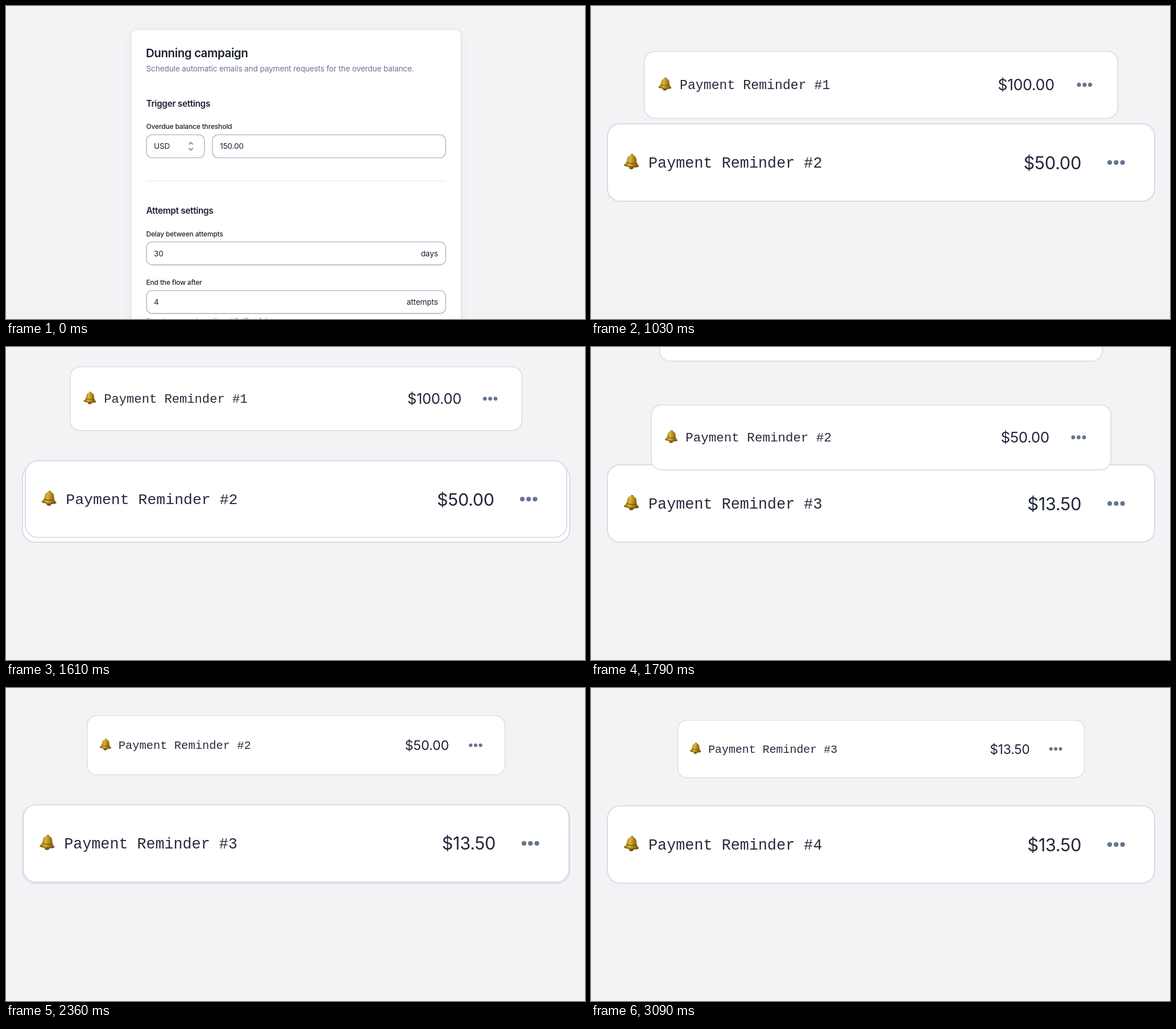
Write an HTML page that moves like this. It is 1018 px wide and 550 px high and loops after 3.36 s.

```html
<!DOCTYPE html>
<html lang="en">
<head>
<meta charset="utf-8">
<title>Dunning campaign</title>
<style>
  html, body { margin: 0; width: 100%; height: 100%; overflow: hidden; background: #f2f3f5; }
  svg { display: block; width: 100vw; height: 100vh; }
  text { font-family: Inter, sans-serif; fill: #1b2130; white-space: pre; }

  .title { font-size: 20.5px; font-weight: 600; letter-spacing: -.021em; }
  .heading { font-size: 15.36px; font-weight: 600; letter-spacing: -.02em; }
  .label { font-size: 11.95px; font-weight: 500; letter-spacing: -.011em; }
  .value { font-size: 13.65px; letter-spacing: -.011em; }
  .muted { fill: #6c7693; }
  .hint { font-size: 11.95px; letter-spacing: -.006em; }
  .end { text-anchor: end; }
  .field { fill: #fff; stroke: #9a9fb6; stroke-width: 1.1; }
  .panel { fill: #fff; stroke: #dcdfe8; filter: drop-shadow(0 3px 6px rgba(25, 33, 61, .08)); }
  .chevron { fill: none; stroke: #6c7693; stroke-width: 1.6; }

  .name { font: 26.8px "IBM Plex Mono", "Liberation Mono", monospace; fill: #252b3b; }
  .price { font-size: 30.7px; letter-spacing: -.009em; text-anchor: end; fill: #20263a; }

  /* Each lift takes about 800 ms of the 3360 ms loop. */
  .card, .form { animation: 3360ms cubic-bezier(.5, 0, 0, 1) infinite; }
  .card { transform: translate(510px, 275px) scale(1); }
  .first { animation-name: first; }
  .second { animation-name: second; }
  .third { animation-name: third; }
  .form { animation-name: cut; animation-timing-function: step-end; }

  @keyframes cut {
    0% { visibility: visible; }
    20.833%, 100% { visibility: hidden; }
  }
  @keyframes first {
    0%, 20.387% { transform: translate(510px, 275px) scale(1); }
    44.196%, 44.435% { transform: translate(510px, 99.3px) scale(.827); }
    68.244%, 100% { transform: translate(510px, -92px) scale(.8); }
  }
  @keyframes second {
    0%, 44.435% { transform: translate(510px, 275px) scale(1); }
    68.244% { transform: translate(510px, 103px) scale(.764); }
    92.054%, 100% { transform: translate(510px, -105px) scale(.74); }
  }
  @keyframes third {
    0%, 68.244% { transform: translate(510px, 275px) scale(1); }
    92.054%, 100% { transform: translate(510px, 107px) scale(.743); }
  }
</style>
</head>
<body>
<svg viewBox="0 0 1018 550">
  <defs>
    <linearGradient id="gold">
      <stop offset="0" stop-color="#8a6512"/>
      <stop offset=".38" stop-color="#dcb638"/>
      <stop offset=".62" stop-color="#ae831b"/>
      <stop offset="1" stop-color="#6b4c0d"/>
    </linearGradient>
    <g id="bell" transform="rotate(4)">
      <ellipse cy="10.4" rx="4.2" ry="3.3" fill="#6b4a0c"/>
      <circle cy="-10.2" r="2.8" fill="#a87d1a"/>
      <path fill="url(#gold)" d="M-13.3 7C-9 4-8.7 0-8.2-4C-7.5-9-4-11 0-11S7.5-9 8.2-4C8.7 0 9 4 13.3 7C13.3 9.5 7 10.6 0 10.6S-13.3 9.5-13.3 7Z"/>
      <path fill="none" stroke="#70500e" stroke-width="1.2" d="M-12.5 7.6Q0 11.5 12.5 7.6M-8.4 2.6Q0 5 8.4 2.6"/>
    </g>
    <g id="base">
      <rect x="-481" y="-68" width="962" height="136" rx="22" fill="#fff" stroke="#dadde6" stroke-width="2"/>
      <use href="#bell" x="-438.5" y="-2"/>
      <g fill="#66748f">
        <circle cx="402" r="4.1"/>
        <circle cx="413.3" r="4.1"/>
        <circle cx="424.6" r="4.1"/>
      </g>
    </g>
  </defs>

  <g class="card">
    <use href="#base"/>
    <text class="name" x="-409" y="9">Payment Reminder #4</text>
    <text class="price" x="352" y="11.5">$13.50</text>
  </g>
  <g class="card third">
    <use href="#base"/>
    <text class="name" x="-409" y="9">Payment Reminder #3</text>
    <text class="price" x="352" y="11.5">$13.50</text>
  </g>
  <g class="card second">
    <use href="#base"/>
    <text class="name" x="-409" y="9">Payment Reminder #2</text>
    <text class="price" x="352" y="11.5">$50.00</text>
  </g>
  <g class="card first">
    <use href="#base"/>
    <text class="name" x="-409" y="9">Payment Reminder #1</text>
    <text class="price" x="352" y="11.5">$100.00</text>
  </g>

  <g class="form">
    <rect width="1018" height="550" fill="#f2f3f5"/>
    <rect class="panel" x="220" y="41.5" width="580" height="600" rx="10"/>
    <text class="title" x="246" y="90">Dunning campaign</text>
    <text class="value muted" x="246.5" y="114.7">Schedule automatic emails and payment requests for the overdue balance.</text>

    <text class="heading" x="246.5" y="177">Trigger settings</text>
    <text class="label" x="246.5" y="216.3">Overdue balance threshold</text>
    <rect class="field" x="247" y="226.3" width="102" height="40.4" rx="10"/>
    <text class="value" x="260" y="251.4">USD</text>
    <path class="chevron" d="M321.4 243.2L325 239.6L328.6 243.2M321.4 249.6L325 253.2L328.6 249.6"/>
    <rect class="field" x="363" y="226.3" width="410" height="40.4" rx="10"/>
    <text class="value" x="376" y="251.4">150.00</text>
    <path stroke="#dfe2ea" d="M247 307.5H773"/>

    <text class="heading" x="246.5" y="365">Attempt settings</text>
    <text class="label" x="246.5" y="404.5">Delay between attempts</text>
    <rect class="field" x="247" y="414.5" width="526" height="40.4" rx="10"/>
    <text class="value" x="260" y="439.6">30</text>
    <text class="value end" x="759.5" y="439.6">days</text>

    <text class="label" x="246.5" y="490">End the flow after</text>
    <rect class="field" x="247" y="500" width="526" height="40.4" rx="10"/>
    <text class="value" x="260" y="525.1">4</text>
    <text class="value end" x="759.5" y="525.1">attempts</text>
    <text class="hint muted" x="246.5" y="557.6">Dunning campaign will end if effort fails</text>
  </g>
</svg>
</body>
</html>
```
